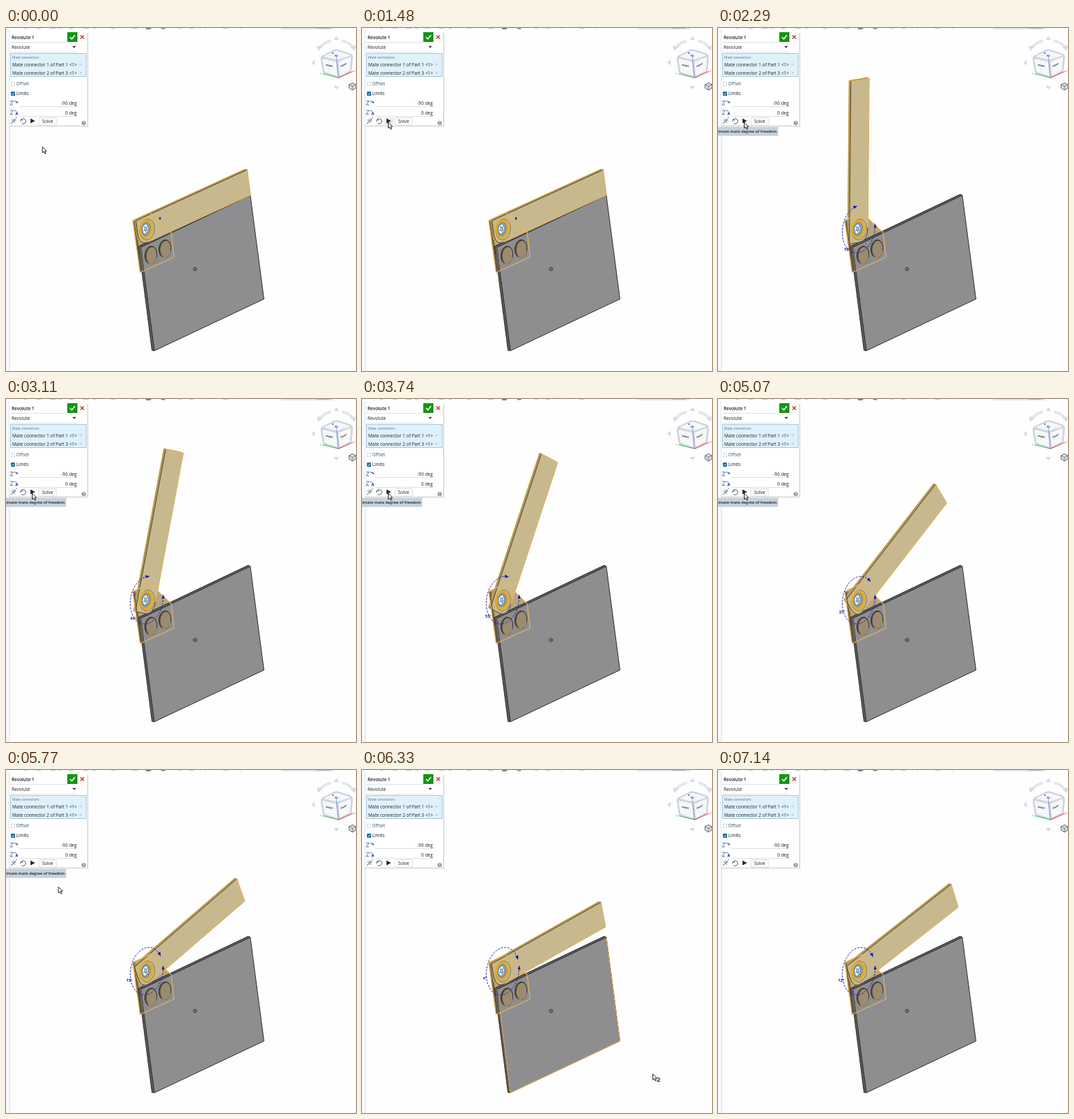
Write an HTML page that moves like this. It is 500 px wide and 491 px high and loops after 7.25 s.

```html
<!DOCTYPE html>
<html lang="en">
<head>
<meta charset="utf-8">
<title>Revolute mate</title>
<style>
html, body { margin: 0; width: 100%; height: 100%; overflow: hidden; background: #fefefe; }
svg { display: block; width: 100%; height: 100%; }
text { font: 6.45px "Open Sans", sans-serif; fill: #1b2226; }
.line { fill: none; stroke: #1c1c1c; stroke-width: .9; }
.glow { fill: none; stroke: #ebb45c; stroke-width: 1.1; stroke-linejoin: round; }
.nav { fill: #d6dae0; }
.arc { fill: none; stroke: #2424cf; stroke-width: 1; stroke-dasharray: 3 1.6; }
.head { fill: #1010c0; }
.face { font-size: 3.2px; font-weight: 700; }
</style>
</head>
<body>
<svg viewBox="0 0 500 491" preserveAspectRatio="none">
  <rect width="500" height="491" fill="#fefefe"/>
  <rect width="4" height="491" fill="#f8f9fa"/>
  <path d="M4.900 3V491" stroke="#e2e4e9" stroke-width="1.400"/>
  <g id="toolbar" fill="#c4c8ce"></g>

  <!-- View cube -->
  <g>
    <path class="nav" d="M472 12l4 5h-8zM436 49.500l5-4v8zM472 88l4-5h-8z"/>
    <path d="M464 18.500Q453 21 449 28M480 18.500Q490 20 495 27" fill="none" stroke="#e3e6ea" stroke-width="4"/>
    <path class="nav" d="M444 25l8 2-6 6zM500 25l-8 2 6 6z"/>
    <path d="M452 40L469 31.500Q472 30.500 475 31.500L493 37.500Q495 39 495 42L493 61Q493 63 491 64L477 71Q475 72 473 71L455 65Q453 64 453 62L450 44Q450 41.500 452 40Z" fill="#cfd5de" stroke="#bcc3cd" stroke-width=".8"/>
    <path d="M456 40.500L472 33.500 490 39 473 44.500ZM453 45L470.500 49 472.500 67.500 456 62ZM476 49L492 42.500 490.500 60 477.500 67Z" fill="#f6f7f9" stroke="#f6f7f9" stroke-width="2" stroke-linejoin="round"/>
    <path d="M475 71L452 65.500" stroke="#42b95a"/>
    <path d="M475 71L496 62" stroke="#e04b3c"/>
    <path d="M471.500 37L475 71" stroke="#6f8be0" stroke-width=".8"/>
    <text class="face" transform="matrix(.95 .2 .1 1 457 54)">FRONT</text>
    <text class="face" transform="matrix(.9 -.4 -.05 1 478 56)">RIGHT</text>
    <text class="face" transform="matrix(.9 .2 -.7 .6 468 40)">TOP</text>
    <circle cx="467" cy="36" r="1" fill="#2a4fd0"/>
    <text x="448" y="67" style="font-size:4px;fill:#42b95a">Y</text>
    <text x="497" y="63" style="font-size:4px;fill:#e04b3c">X</text>
    <path d="M490 81l5-2.500 5 2.500v5l-5 3-5-3z" fill="#d9dce0" stroke="#444a52" stroke-width=".8"/>
    <path d="M490 81l5 2.500 5-2.500M495 83.500v5.500" fill="none" stroke="#444a52" stroke-width=".6"/>
  </g>

  <!-- Bracket behind the plate -->
  <path d="M181 275.500L205.500 264 236 293 240 328 191.500 350Z" fill="#b7a67b"/>
  <path d="M181 275.500L185 276 195 348 191.500 350Z" fill="#857654"/>
  <path d="M184.500 277.500L206 267.500" stroke="#6d6247" stroke-width=".7"/>

  <!-- Plate -->
  <path d="M189.500 312.500L346 238 349 239.500 192.500 314 212 462 208.500 461.500Z" fill="#5c5c5e"/>
  <path d="M192.500 314L349 239.500 368.500 388 212 462Z" fill="#8e8e90"/>
  <path class="line" d="M189.500 312.500L346 238 349 239.500 368.500 388 212 462 208.500 461.500ZM192.500 314L212 462M192.500 314L349 239.500"/>
  <path id="plateGlow" class="glow" d="M193 314L212 462 368.500 388 349 239.500"/>
  <circle cx="270" cy="345" r="2.300" fill="#aaa" stroke="#111" stroke-width=".9"/>
  <circle cx="270" cy="345" r=".8" fill="#111"/>

  <!-- Swinging bar -->
  <path id="barBack" fill="#a3956a" stroke="#ebb048" stroke-width="1.100" stroke-linejoin="round"/>
  <path id="barSide" fill="#a89a6e"/>
  <path id="barFront" fill="#c7b98d" stroke="#ebb048" stroke-width="1" stroke-linejoin="round"/>
  <path id="barEdge" fill="none" stroke="#3b3527" stroke-width=".9"/>

  <!-- Bracket outline, bores and hub -->
  <path d="M190.500 311L194 316 197 347 192 349Z" fill="#675f50"/>
  <path class="glow" d="M181 275.500L205.500 264 236 293 240 328 191.500 350Z"/>
  <path d="M183 277L193 347" stroke="#4a4333" stroke-width=".8"/>
  <g id="bores"></g>
  <g transform="translate(200.300 287.700) rotate(8)">
    <ellipse cx="1.500" cy=".5" rx="10.500" ry="15" fill="none" stroke="#6d6245" stroke-width=".7"/>
    <ellipse rx="8.500" ry="12.500" fill="#b9ac86" stroke="#f2a900" stroke-width="2.200"/>
    <ellipse cx="-.3" rx="5.800" ry="9.500" fill="#a6a399" stroke="#6a675c" stroke-width=".7"/>
    <ellipse cx="-1.200" cy=".3" rx="4.300" ry="7.300" fill="#eef4f8" stroke="#438dc6"/>
    <path d="M-3-4L1 5M2-5L-2 1M-4 3L2 1" stroke="#476b85" stroke-width=".8"/>
    <ellipse cx="-.7" rx="1.300" ry="2.400" fill="#fff" stroke="#333" stroke-width=".7"/>
  </g>

  <!-- Rotation gauge -->
  <g id="gauge">
    <path id="arc" class="arc"/>
    <path id="headA" class="head" d="M3 0L-3 2.300V-2.300Z"/>
    <path id="headB" class="head" d="M3 0L-3 2V-2Z"/>
    <text id="angle" text-anchor="middle" style="font-size:5.500px;font-weight:700;fill:#1616a8"></text>
  </g>
  <ellipse id="dot" cx="220" cy="272.500" rx="1.300" ry="2.100" fill="#2626a0"/>

  <!-- Dialog -->
  <rect x="5" y="7" width="113" height="135" fill="#000" opacity=".06"/>
  <rect x="5" y="7" width="112" height="133.500" fill="#000" opacity=".12"/>
  <rect x="5" y="5" width="111" height="134.500" fill="#fff"/>
  <text x="8" y="15.800" style="font-weight:600">Revolute 1</text>
  <path d="M6 20.500H87M6 34.500H102M19 112.500H102M19 126.500H102" stroke="#d5d9de" stroke-width=".8"/>
  <rect x="87.500" y="6" width="14.500" height="14" fill="#149414"/>
  <path d="M91.500 13l2.500 2.800 4.500-5.500" fill="none" stroke="#fff" stroke-width="1.500"/>
  <path d="M106.300 10.500l5 5m0-5l-5 5" stroke="#d73527" stroke-width="1.500"/>
  <text x="8" y="29.500">Revolute</text>
  <path d="M95 25.800h5l-2.500 3z" fill="#333"/>
  <rect x="6.500" y="36.500" width="108" height="33" fill="#dff1fb" stroke="#94bdd6" stroke-width=".8"/>
  <text x="9" y="43.800" style="font-size:4.900px;fill:#55707f">Mate connectors</text>
  <text x="9" y="54.500">Mate connector 1 of Part 1 &lt;1&gt;</text>
  <text x="9" y="66.700">Mate connector 2 of Part 3 &lt;1&gt;</text>
  <path d="M105 50.500l3 3m0-3l-3 3M105 62.700l3 3m0-3l-3 3" stroke="#9ab0bd" stroke-width=".7"/>
  <rect x="7.500" y="77.500" width="5" height="5" fill="#fff" stroke="#c5cad0" stroke-width=".7"/>
  <text x="14.500" y="82.300" style="fill:#39566b">Offset</text>
  <rect x="7" y="91" width="6" height="6" rx="1" fill="#1767ad"/>
  <path d="M8.300 94l1.300 1.400 2.300-2.900" fill="none" stroke="#fff" stroke-width=".9"/>
  <text x="14.500" y="96.400">Limits</text>
  <g fill="none" stroke="#33539c" stroke-width=".8">
    <path d="M6 104.500h4l-4 5.500h4M11 105q4-1 5 3M6 118h4l-4 5.500h4M11 118.500q4-1 5 3M13 124h4"/>
    <path d="M14 105l3 2M14 121.500l3 1.500" stroke="#1c3fd0" stroke-width="1.500"/>
  </g>
  <text x="101" y="110.300" text-anchor="end">-90 deg</text>
  <text x="101" y="124" text-anchor="end">0 deg</text>
  <rect id="hover" x="32" y="128" width="13" height="12" fill="#e9ecef"/>
  <g fill="none" stroke="#3a4046" stroke-width=".9">
    <path d="M7 137l7-7M10 129.500l4 4M8 131l4.500 4.500M14 129l1.500-1"/>
    <path d="M21.500 131.500a3.700 3.700 0 1 1 1 5M20.500 134l1-3 2.500 1"/>
  </g>
  <path d="M35 129.500v7l6.500-3.500z" fill="#24292e"/>
  <rect x="47" y="128.500" width="25" height="10.500" rx="1" fill="#fff" stroke="#cfd3d8" stroke-width=".8"/>
  <text x="59.500" y="136" text-anchor="middle">Solve</text>
  <circle cx="111" cy="136" r="3" fill="#8f959b"/>
  <text x="111" y="138" text-anchor="middle" style="font-size:5px;font-weight:700;fill:#fff">?</text>

  <g id="tip">
    <rect x="-8" y="141.500" width="94" height="13" fill="#c6d1dc"/>
    <text x="84" y="150.200" text-anchor="end" style="font-size:5.700px;font-weight:600">Animate mate degree of freedom</text>
  </g>
  <g id="cursor">
    <path d="M0 0V8.500L2 6.800 3.500 10 5 9.300 3.500 6.200H6Z" fill="#fff" stroke="#111" stroke-width=".9"/>
    <path id="badge" d="M6.500 6.500Q9.500 5 9.700 7.300L6.700 10.700H10.500" fill="none" stroke="#222" stroke-width="1.100"/>
  </g>
</svg>
<script>
const LOOP = 7250;
const $ = id => document.getElementById(id);
const set = (id, attrs) => {
  for (const k in attrs) $(id).setAttribute(k, attrs[k]);
};
const show = (id, on) => set(id, { visibility: on ? "visible" : "hidden" });

// Bursts of redraws: first time, last time, count.
const bursts = [
  [620, 1180, 11], [1480, 1480, 1], [1620, 1850, 6], [2000, 2000, 1],
  [2180, 2810, 7], [2920, 3110, 3], [3250, 3810, 7], [4000, 4030, 2],
  [4180, 4180, 1], [4330, 4770, 6], [4920, 5070, 3], [5180, 5180, 1],
  [5330, 6030, 16], [6070, 6330, 7], [6370, 6770, 9], [6880, 7140, 4]
];
const swing = [[1620, 90], [2290, 78.7], [3110, 64], [3810, 51], [4330, 43],
  [4770, 33.5], [5070, 27], [6330, 4], [6550, 0], [7140, 12]];
const mouseX = [[620, 52], [1180, 37.5], [5560, 37.5], [6030, 130], [6330, 415.5], [6720, 452]];
const mouseY = [[620, 170], [1180, 135], [5560, 135], [6030, 215], [6330, 435], [6720, 492]];

function held(t) {
  let last = 0;
  for (const [a, b, n] of bursts) {
    if (t < a) break;
    const step = n > 1 ? (b - a) / (n - 1) : 1;
    last = a + step * Math.min(n - 1, Math.floor((t - a) / step + 1e-6));
  }
  return last;
}

function track(keys, t) {
  if (t <= keys[0][0]) return keys[0][1];
  for (let i = 1; i < keys.length; i++) {
    const [t0, v0] = keys[i - 1], [t1, v1] = keys[i];
    if (t <= t1) return v0 + (v1 - v0) * (t - t0) / (t1 - t0);
  }
  return keys[keys.length - 1][1];
}

// The mechanism's plane, seen obliquely: one unit is the bar's reach.
const PIVOT = [201, 288], U = [157, -72], V = [29, 220];
const project = (x, y) => [0, 1].map(i => PIVOT[i] + x * U[i] + y * V[i]);
const turned = (x, y, deg) => {
  const a = deg * Math.PI / 180, c = Math.cos(a), s = Math.sin(a);
  return project(x * c + y * s, y * c - x * s);
};
const back = p => [p[0] - 2.6, p[1] - 1.2];
const pt = p => p.map(v => v.toFixed(2)).join(" ");
const poly = ps => "M" + ps.map(pt).join("L");

function drawBar(deg) {
  const h = 0.0826, end = 0.93;
  const at = (x, y) => turned(x, y, deg);
  const tipTop = at(end, -h), tipLow = at(end, h), top = at(-h, -h);
  const low = at(-h, h), r0 = at(0, h), r1 = at(-h, 0);
  const outline = f => poly([top, tipTop, tipLow, r0].map(f)) +
    "Q" + pt(f(low)) + " " + pt(f(r1)) + "Z";
  set("barBack", { d: outline(back) });
  set("barSide", { d: poly([top, tipTop, back(tipTop), back(top)]) + "Z" +
    poly([tipTop, tipLow, back(tipLow), back(tipTop)]) + "Z" });
  set("barFront", { d: outline(p => p) });
  set("barEdge", { d: poly([r0]) + "Q" + pt(low) + " " + pt(r1) +
    "L" + pt(top) + "L" + pt(tipTop) });
}

const R = 0.147;
const onRing = (deg, r = R) => turned(r, 0, deg);

function placeHead(id, deg, dir) {
  const p = onRing(deg), q = onRing(deg + dir * 4);
  const a = Math.atan2(q[1] - p[1], q[0] - p[0]) * 180 / Math.PI;
  set(id, { transform: `translate(${pt(p)}) rotate(${a.toFixed(1)})` });
}

function drawGauge(deg) {
  const from = deg + 12, to = 351, ring = [];
  for (let i = 0; i <= 60; i++) ring.push(onRing(from + (to - from) * i / 60));
  set("arc", { d: poly(ring) });
  placeHead("headA", from, -1);
  placeHead("headB", to, 1);
  const [x, y] = onRing((from + to) / 2, R + 0.018);
  set("angle", { x, y: y - 2 });
  $("angle").textContent = Math.round(deg) + "°";
}

function draw(time) {
  const t = held(time), running = t >= 1620;
  const deg = running ? track(swing, t) : 0;
  drawBar(deg);
  show("gauge", running);
  show("dot", !running);
  if (running) drawGauge(deg);
  show("tip", running && t < 6070);
  show("hover", t >= 1480 && t < 1620);
  show("plateGlow", t > 6080 && t < 6480);
  show("badge", t > 6080);
  show("cursor", t < 6720);
  set("cursor", { transform: `translate(${track(mouseX, t)} ${track(mouseY, t)})` });
}

$("bores").innerHTML = [[207, 325], [227, 316]].map(([x, y]) =>
  `<g transform="translate(${x} ${y}) rotate(6)">
    <ellipse rx="8.500" ry="12.800" fill="#57503f" stroke="#2b2822" stroke-width=".9"/>
    <ellipse cx=".9" cy=".3" rx="7.200" ry="11.800" fill="#9b8b70"/>
    <path d="M8 3A8.500 12.800 0 0 1-3 12" fill="none" stroke="#d9a34e" stroke-width=".8"/>
  </g>`).join("");

$("toolbar").innerHTML = [26, 44, 63, 76, 90, 110, 124, 150, 180, 247, 262, 310]
  .map((x, i) => `<rect x="${x}" width="${4 + i % 3 * 2}" height="1"/>`).join("") +
  `<path d="M199 0h9l-2 2h-5zM221 0h7l-1.500 1.500h-4z" fill="#7d828a"/>
   <path d="M285 0v3M335 0v3" stroke="#d8dbe0"/>
   <rect x="393" width="75" height="2" fill="#e4e6ea"/>
   <rect x="444" width="18" height="1" fill="#b4b9c0"/>`;

function tick() {
  draw(performance.now() % LOOP);
  requestAnimationFrame(tick);
}
tick();
</script>
</body>
</html>
```
